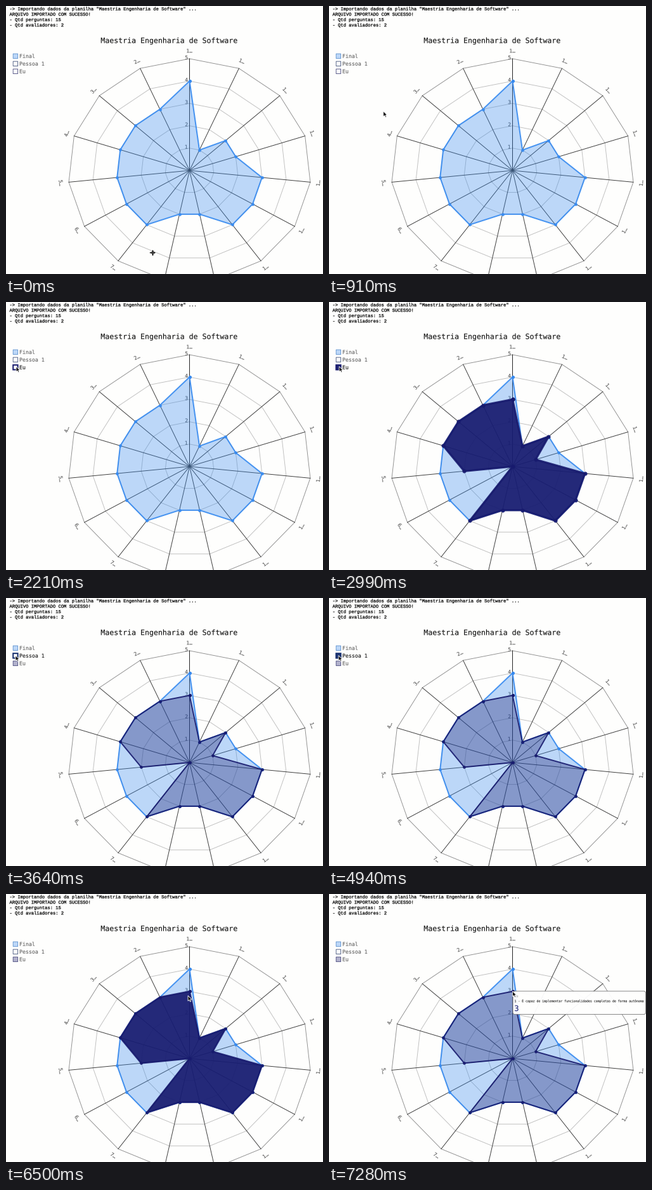
Animation of 500x422 px, one loop 8 s. Source, as a matplotlib script:

```python
import numpy as np
import matplotlib.pyplot as plt
from matplotlib.animation import FuncAnimation
from matplotlib.patches import FancyBboxPatch, PathPatch, Polygon, Rectangle
from matplotlib.textpath import TextPath
from matplotlib.transforms import Affine2D

W, H, DPI = 500, 422, 100
STEP, LOOP, INTERVAL = 130, 8000, 40
PT = 72 / DPI
CX, CY, RX, RY = 289.5, 259, 191.5, 176
N = 15
ANGLES = 2 * np.pi * np.arange(N) / N
MONO = "DejaVu Sans Mono"

fig = plt.figure(figsize=(W / DPI, H / DPI), dpi=DPI, facecolor="#fefefd")
ax = fig.add_axes([0, 0, 1, 1])
ax.set_xlim(0, W)
ax.set_ylim(H, 0)
ax.axis("off")


def polar(values):
    r = np.asarray(values) / 5
    return np.column_stack([CX + RX * r * np.sin(ANGLES),
                            CY - RY * r * np.cos(ANGLES)])


def label(x, y, text, size, color="#555555", font=MONO, z=2, align=0,
          turn=0, middle=False, weight=0.1):
    """Outline text; align is the share of its width left of x, turn is clockwise."""
    path = TextPath((0, 0), text, size=size, prop={"family": font})
    box = path.get_extents()
    drop = (box.y0 + box.y1) / 2 if middle else 0
    place = (Affine2D().translate(-align * (box.x0 + box.x1), -drop)
             .scale(1, -1).rotate_deg(turn).translate(x, y))
    return ax.add_patch(PathPatch(place.transform_path(path), color=color,
                                  lw=weight * PT, zorder=z, snap=False))


def draw_console():
    lines = ['-> Importando dados da planilha "Maestria Engenharia de Software" ...',
             "ARQUIVO IMPORTADO COM SUCESSO!",
             "- Qtd perguntas: 15",
             "- Qtd avaliadores: 2"]
    for i, line in enumerate(lines):
        label(5.5, 6.8 + 8.5 * i, line, 7.13, "#111111", "Liberation Mono",
              weight=0.3)


def draw_grid():
    for level in range(1, 6):
        color = "#8c8c8c" if level == 5 else "#bdbdbd"
        ax.add_patch(Polygon(polar(np.full(N, level)), fill=False, ec=color,
                             lw=0.9 * PT, zorder=1, snap=False))
        label(287, CY - RY * level / 5 + 0.8, str(level), 8, align=1)
    for i, (x, y) in enumerate(polar(np.full(N, 5))):
        ax.plot([CX, x], [CY, y], color="#1c1c1c" if i == 0 else "#3a3a3a",
                lw=0.95 * PT, zorder=1.5, snap=False)
        turn = np.degrees(ANGLES[i])
        if 90 < turn < 270:
            turn += 180
        number = 1 if i == 0 else 16 - i
        label(x + 12.5 * np.sin(ANGLES[i]), y - 12.5 * np.cos(ANGLES[i]),
              str(number)[0] + "…", 8, turn=turn, align=0.5, middle=True)


class Series:
    def __init__(self, name, color, values, row, z):
        self.color = np.array(color) / 255
        points = polar(values)
        self.fill = ax.add_patch(Polygon(points, fc=self.color, lw=0, zorder=z,
                                         snap=False))
        loop = np.vstack([points, points[:1]])
        self.line, = ax.plot(*loop.T, color=self.color, zorder=z + 0.1, alpha=0.9,
                             marker="o", mew=0, solid_joinstyle="round", snap=False)
        y = 75.2 + 12 * row
        self.box = ax.add_patch(Rectangle((11.2, y), 7.4, 7.4, zorder=z, snap=False))
        self.text = label(21, y + 6.6, name, 8.25)

    def update(self, active, hovered, box_on, pointed):
        for artist in (self.fill, self.line):
            artist.set_visible(active)
        self.fill.set_alpha(0.92 if hovered else 0.33)
        self.line.set_linewidth((3.2 if pointed else 2.6 if hovered else 2) * PT)
        self.line.set_markersize((6.2 if pointed else 4.8) * PT)
        alpha = (0.95 if pointed else 0.33) if box_on else 0
        self.box.set_facecolor((*self.color, alpha))
        self.box.set_edgecolor(self.color if pointed else 0.6 * self.color + 0.25)
        self.box.set_linewidth((2 if pointed else 0.9) * PT)


draw_console()
label(257.2, 58.3, "Maestria Engenharia de Software", 11.57, "#111111", align=0.5)
draw_grid()

final_values = [4, 1, 2, 2, 3, 3, 3, 2, 2, 3, 3, 3, 3, 3, 3]
own_values = [3, 1, 2, 1, 3, 3, 3, 2, 2, 3, 0, 2, 3, 3, 3]
series = {
    "final": Series("Final", (54, 138, 240), final_values, 0, 3),
    "person": Series("Pessoa 1", (20, 45, 110), final_values, 1, 4),
    "own": Series("Eu", (23, 26, 110), own_values, 2, 5),
}

tooltip = [
    ax.add_patch(FancyBboxPatch((292.5, 155.5), 204.5, 31.5,
                                boxstyle="round,pad=2.5,rounding_size=3",
                                fc="#fefefe", ec="#777777", lw=0.9 * PT, zorder=7)),
    label(292.5, 162.3, "Eu", 5, "#a0a0a0", z=8),
    label(292.5, 170.3, "1 - É capaz de implementar funcionalidades completas "
          "de forma autônoma", 4.84, "#111111", z=8),
    label(292.3, 184.2, "3", 12, "#1a2074", z=8),
]

ARROW = np.array([(0, 0), (0, 8.4), (2, 6.7), (3.4, 9.6), (4.9, 8.9),
                  (3.6, 6.2), (6.1, 6)])
arrow = ax.add_patch(Polygon(ARROW, fc="#111111", ec="white", lw=0.8 * PT, zorder=9))
cross = [ax.plot(x, y, color="#111111", lw=1.4 * PT, zorder=9)[0]
         for x, y in (([227, 234], [388, 388]), ([230.5, 230.5], [384.5, 391.5]))]
cross += [ax.plot([230.5 + dx], [388 + dy], marker=m, ms=3 * PT, mew=0,
                  color="#111111", zorder=9)[0]
          for dx, dy, m in ((3, 0, ">"), (-3, 0, "<"), (0, 3, "v"), (0, -3, "^"))]

# Pointer stops: time in ms, x, y of the tip.
POINTER = np.array([
    (0, 230, 385), (260, 230, 385), (1170, 28, 78), (1300, 28, 78),
    (1560, 28.5, 85), (2210, 16, 101.5), (2990, 16, 101.5),
    (3640, 15, 90.5), (5200, 15, 90.5), (5980, 281, 184),
    (6110, 281, 184), (6500, 287, 160), (7020, 289.5, 153), (LOOP, 289.5, 153)])

# Which series the pointer emphasises, and from when.
HOVER = [(0, None), (1040, "final"), (1690, "person"), (1950, "own"),
         (3250, "person"), (5460, None), (5850, "own"), (7150, None)]


def hovered_at(t):
    return [name for start, name in HOVER if start <= t][-1]


def update(i):
    tick = (i * INTERVAL + INTERVAL - 1) // STEP
    t = min(tick * STEP, 7280)
    hovered = hovered_at(t)
    in_legend = t < 5460
    active = {"final": True, "person": 4030 <= t < 4940, "own": t >= 2340}
    box_on = dict(active, person=4030 <= t < 5070)
    for name, item in series.items():
        on = name == hovered
        item.update(active[name], on, box_on[name], on and in_legend)
        dark = on and in_legend and not (name == "final" and t >= 1560)
        item.text.set_color("#111111" if dark else "#606060")

    x = np.interp(t, POINTER[:, 0], POINTER[:, 1])
    y = np.interp(t, POINTER[:, 0], POINTER[:, 2])
    arrow.set_xy(ARROW + (x, y))
    arrow.set_visible(t >= 130)
    for part in cross:
        part.set_visible(t < 130)

    for part in tooltip:
        part.set_visible(t >= 7150)
        part.set_alpha(0.5 if t < 7280 else 0.96)
    return []


anim = FuncAnimation(fig, update, frames=LOOP // INTERVAL, interval=INTERVAL,
                     repeat=True, repeat_delay=0, blit=False)
plt.show()
```
